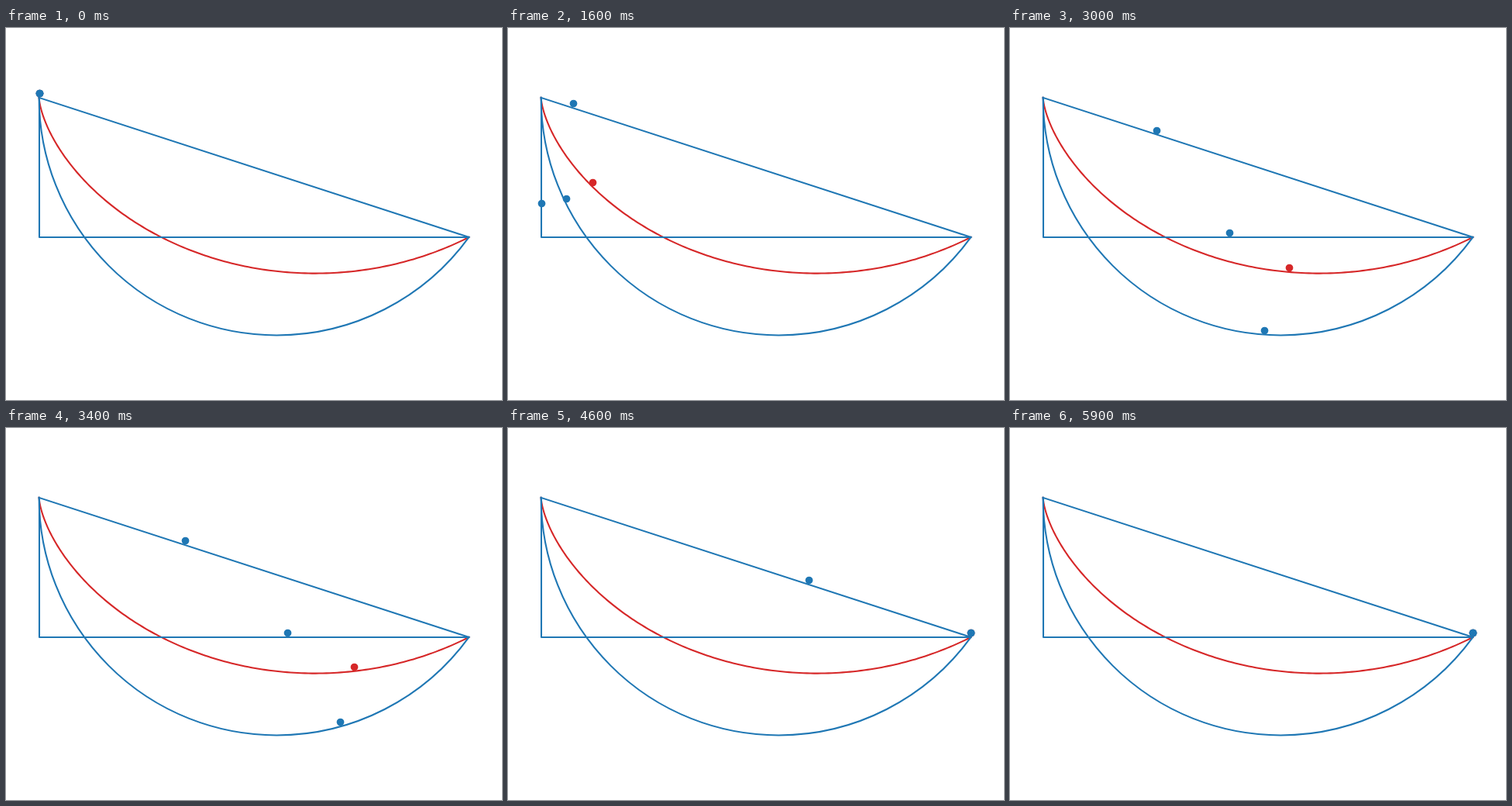
An HTML page with a canvas for the animation above (6000 ms loop, 640 by 480 pixels).

```html
<!DOCTYPE html>
<html lang="en">
<head>
<meta charset="utf-8">
<title>Racing balls on four slopes</title>
<style>
  html, body { margin: 0; width: 100%; height: 100%; overflow: hidden; background: #fff; }
  canvas { display: block; }
</style>
</head>
<body>
<canvas id="stage" width="640" height="480"></canvas>
<script>
const ctx = document.getElementById('stage').getContext('2d');
const BLUE = '#1f77b4', RED = '#d62728';
const STEP = 100, STEPS = 60;

// Start corner, drop and run in pixels; gravity in pixels per step squared
const X0 = 42.67, Y0 = 89.88, W = 554.67, H = 180;
const FALL = 18, G = 2 * H / FALL ** 2;

// Cycloid through both ends: bisect for the final rolling angle
let lo = Math.PI, hi = 5;
for (let i = 0; i < 50; i++) {
  const mid = (lo + hi) / 2;
  if ((mid - Math.sin(mid)) / (1 - Math.cos(mid)) < W / H) lo = mid; else hi = mid;
}
const rollEnd = lo;
const roll = H / (1 - Math.cos(rollEnd));
const rollRate = Math.sqrt(G / roll);
const cycloid = a => [roll * (a - Math.sin(a)), roll * (1 - Math.cos(a))];

// Circle with a vertical tangent at the start
const R = (W * W + H * H) / (2 * W);
const swingEnd = Math.PI - Math.asin(H / R);
const swing = [];
for (let n = 0, a = 0, v = 0, dt = 0.01; n < STEPS; n++) {
  swing.push(Math.min(a, swingEnd));
  for (let i = 0; i < 100; i++) {
    v += G / R * Math.cos(a) * dt / 2;
    a += v * dt;
    v += G / R * Math.cos(a) * dt / 2;
  }
}

// Ball positions relative to the start corner at step n
const onCycloid = n => cycloid(Math.min(rollRate * n, rollEnd));
const onCircle = n => [R * (1 - Math.cos(swing[n])), R * Math.sin(swing[n])];
const onRamp = n => {
  const x = Math.min(W, G * n * n / 2 * W * H / (W * W + H * H));
  return [x, x * H / W];
};
const onCorner = n => n <= FALL
  ? [0, G * n * n / 2]
  : [Math.min(W, G * FALL * (n - FALL)), H];

const balls = [[onCycloid, RED], [onRamp, BLUE], [onCorner, BLUE], [onCircle, BLUE]];

function stroke(color, trace) {
  ctx.strokeStyle = color;
  ctx.beginPath();
  trace();
  ctx.stroke();
}

function polyline(points) {
  for (const [x, y] of points) ctx.lineTo(x, y);
}

const cycloidPath = Array.from({ length: 201 }, (_, i) => {
  const [x, y] = cycloid(rollEnd * i / 200);
  return [X0 + x, Y0 + y];
});

function draw(n) {
  ctx.fillStyle = '#fff';
  ctx.fillRect(0, 0, 640, 480);
  ctx.lineWidth = 2.083;
  ctx.lineCap = 'square';
  ctx.lineJoin = 'round';
  stroke(RED, () => polyline(cycloidPath));
  stroke(BLUE, () => polyline([[X0, Y0], [X0 + W, Y0 + H]]));
  stroke(BLUE, () => polyline([[43, 90], [43, 270], [597, 270]]));
  stroke(BLUE, () => ctx.arc(X0 + R, Y0, R, Math.PI, Math.PI - swingEnd, true));

  // Balls sit on whole pixels, just above their track
  for (const [place, color] of balls) {
    const [x, y] = place(n);
    ctx.fillStyle = color;
    ctx.beginPath();
    ctx.arc(Math.round(X0 + x) + 0.5, Math.round(Y0 + y) - 5.5, 4.86, 0, 2 * Math.PI);
    ctx.fill();
  }
}

const begin = performance.now();
function tick() {
  draw(Math.floor((performance.now() - begin) / STEP) % STEPS);
  requestAnimationFrame(tick);
}
tick();
</script>
</body>
</html>
```
